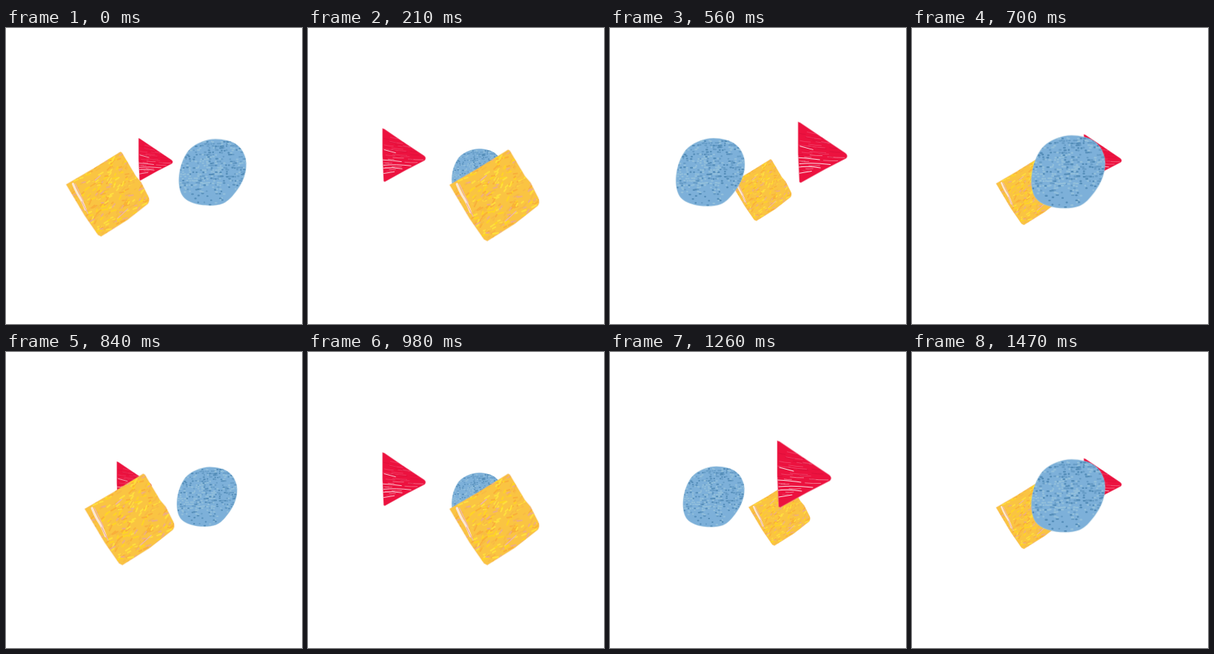
An HTML page that plays this animation: 400 by 400 pixels, repeating every 1540 ms.

```html
<!DOCTYPE html>
<html lang="en">
<head>
<meta charset="utf-8">
<title>Orbiting shapes</title>
<style>
html, body { margin: 0; width: 100%; height: 100%; overflow: hidden; background: #fff; }
svg { display: block; width: 100vw; height: 100vh; }
</style>
</head>
<body>
<svg id="stage" viewBox="0 0 400 400"></svg>
<script>
const NS = 'http://www.w3.org/2000/svg';
const stage = document.getElementById('stage');
const STEP = 70, STEPS = 11;

function add(parent, tag, attrs) {
  const el = document.createElementNS(NS, tag);
  for (const key in attrs) el.setAttribute(key, attrs[key]);
  parent.appendChild(el);
  return el;
}

function random(seed) {
  return () => {
    seed = (seed * 1664525 + 1013904223) >>> 0;
    return seed / 4294967296;
  };
}

// Closed smooth curve through the given points
function smooth(pts) {
  const n = pts.length, at = i => pts[(i + n) % n];
  let d = 'M' + pts[0];
  for (let i = 0; i < n; i++) {
    const [a, b, c, e] = [at(i - 1), at(i), at(i + 1), at(i + 2)];
    const c1 = b.map((v, j) => v + (c[j] - a[j]) / 6);
    const c2 = c.map((v, j) => v - (e[j] - b[j]) / 6);
    d += `C${c1} ${c2} ${c}`;
  }
  return d + 'Z';
}

function makeShape(id, d, fill, edge) {
  const g = add(stage, 'g', {});
  add(add(g, 'clipPath', { id }), 'path', { d });
  add(g, 'path', { d, fill, stroke: edge, 'stroke-width': 1.6, 'stroke-opacity': 0.35, 'stroke-linejoin': 'round' });
  return { g, art: add(g, 'g', { 'clip-path': `url(#${id})`, fill: 'none', 'stroke-linecap': 'round' }) };
}

function marks(art, colors, width, opacity) {
  const layers = colors.map(() => '');
  return {
    put: (i, d) => { layers[i] += d; },
    draw: () => layers.forEach((d, i) => add(art, 'path', {
      d, stroke: colors[i], 'stroke-width': width, 'stroke-opacity': opacity
    }))
  };
}

function makeSquare() {
  const shape = makeShape('square',
    'M-56-13L-20-34L17-57L19-56L38-24L45-16L55 4Q57 9 54 13L26 35L-9 57L-13 55L-31 29Z',
    '#fac442', '#f6bd62');
  const rnd = random(11);
  const layer = marks(shape.art, ['#ffd91e', '#f9aa39', '#ffe63c', '#eda993', '#f8b945'], 2, 0.8);
  for (let i = 0; i < 430; i++) {
    const x = rnd() * 114 - 57, y = rnd() * 114 - 57;
    const pink = x * 0.85 + y * 0.5 > 24 ? 0.3 : 0.1;
    const kind = rnd() < pink ? 3 : [0, 1, 2, 4][Math.floor(rnd() * 4)];
    const len = 2 + rnd() * 5, a = -0.65 + (rnd() - 0.5) * 1.1;
    layer.put(kind, `M${x} ${y}l${len * Math.cos(a)} ${len * Math.sin(a)}`);
  }
  layer.draw();
  add(shape.art, 'path', { d: 'M-47-14Q-42-2-38 4T-30 21', stroke: '#fbe6d3', 'stroke-width': 3 });
  add(shape.art, 'path', { d: 'M-44-14L-33 9M-35 10L-27 26M-17-19L-10-25M14 32L27 20', stroke: '#efb6a4', 'stroke-width': 1.4 });
  return shape.g;
}

function makeCircle() {
  const shape = makeShape('circle', smooth([
    [-5, -45], [20, -44], [37, -35], [46, -17], [44, 5], [32, 27],
    [14, 43], [-15, 45], [-38, 36], [-46, 17], [-43, -10], [-30, -33]
  ]), '#7db0d9', '#9cc2dd');
  const rnd = random(29);
  const layer = marks(shape.art, ['#4c86b2', '#6299c3', '#98c4dc'], 2.2, 0.8);
  for (let y = -43; y < 45; y += 3) {
    for (let x = -45; x < 46; x += 3) {
      const px = x + rnd() * 2, py = y + rnd() * 1.2, r = rnd();
      const dark = y > 24 ? 0.08 : y > 8 ? 0.2 : x > -8 ? 0.36 : 0.2;
      const light = y > 26 ? 0.03 : x < 10 && y > -22 ? 0.32 : 0.12;
      const dab = `M${px} ${py}h${0.3 + rnd() * 1.8}`;
      if (r < dark) layer.put(rnd() < 0.5 ? 0 : 1, dab);
      else if (r > 1 - light) layer.put(2, dab);
    }
  }
  layer.draw();
  return shape.g;
}

function makeTriangle() {
  const shape = makeShape('triangle',
    'M-36-45L-33-44L-2-23L34 1Q39 5 35 9L4 25L-32 45L-34 44L-36 0Z', '#ec123f', '#f0718a');
  const rnd = random(5);
  const layer = marks(shape.art, ['#f7a9b8', '#f2567a', '#d50d38'], 0.9, 0.75);
  for (let i = 0; i < 46; i++) {
    const y = rnd() * 86 - 42, x = rnd() * 50 - 38;
    const len = 6 + rnd() * 20, slope = 0.22 - (y + 42) * 0.0035;
    const kind = y > 2 && rnd() < 0.4 ? 0 : 1 + Math.floor(rnd() * 2);
    layer.put(kind, `M${x} ${y}q${len / 2} ${len * slope / 2 + 0.8} ${len} ${len * slope}`);
  }
  layer.draw();
  add(shape.art, 'path', {
    d: 'M-36 8Q-18 9-4 11M-34 17Q-14 15 12 18M-35 22Q-20 20-3 23M-34 31L-16 28M-33-9L-14-4',
    stroke: '#fbdbe2', 'stroke-width': 1.1
  });
  return shape.g;
}

// x and size per step; height follows from size; phase sets the depth
const shapes = [
  { g: makeTriangle(), unit: 90, phase: 6, y: s => 199.1 - 0.379 * s,
    x: [202, 173, 145, 129.5, 128, 157, 209, 262, 287, 276, 257.5],
    size: [57, 58, 64, 72, 83, 90, 92, 90, 82, 72, 63] },
  { g: makeCircle(), unit: 92, phase: 2, y: s => 201.6 - 0.0725 * s,
    x: [279, 271.5, 252, 228, 203.5, 178.5, 157, 140, 135.5, 166, 211],
    size: [90, 80.5, 73, 67, 66.5, 68.5, 73, 82, 92, 98, 98.5] },
  { g: makeSquare(), unit: 114, phase: 10, y: s => 204.5 + 0.176 * s,
    x: [137.5, 167, 208, 252, 274.5, 270, 251, 229, 204.5, 181, 158.5],
    size: [114, 123, 127, 123, 113, 100, 90, 84.5, 83, 86, 91] }
];

let shown = -1;
function render(ms) {
  const k = Math.floor(ms / STEP) % STEPS;
  if (k === shown) return;
  shown = k;
  const depth = s => Math.cos((s.phase + k) * Math.PI / 6);
  [...shapes].sort((a, b) => depth(a) - depth(b)).forEach(s => {
    const size = s.size[k];
    s.g.setAttribute('transform', `translate(${s.x[k]} ${s.y(size)}) scale(${size / s.unit})`);
    stage.appendChild(s.g);
  });
}

const start = performance.now();
function tick() {
  render(performance.now() - start);
  requestAnimationFrame(tick);
}
tick();
</script>
</body>
</html>
```
